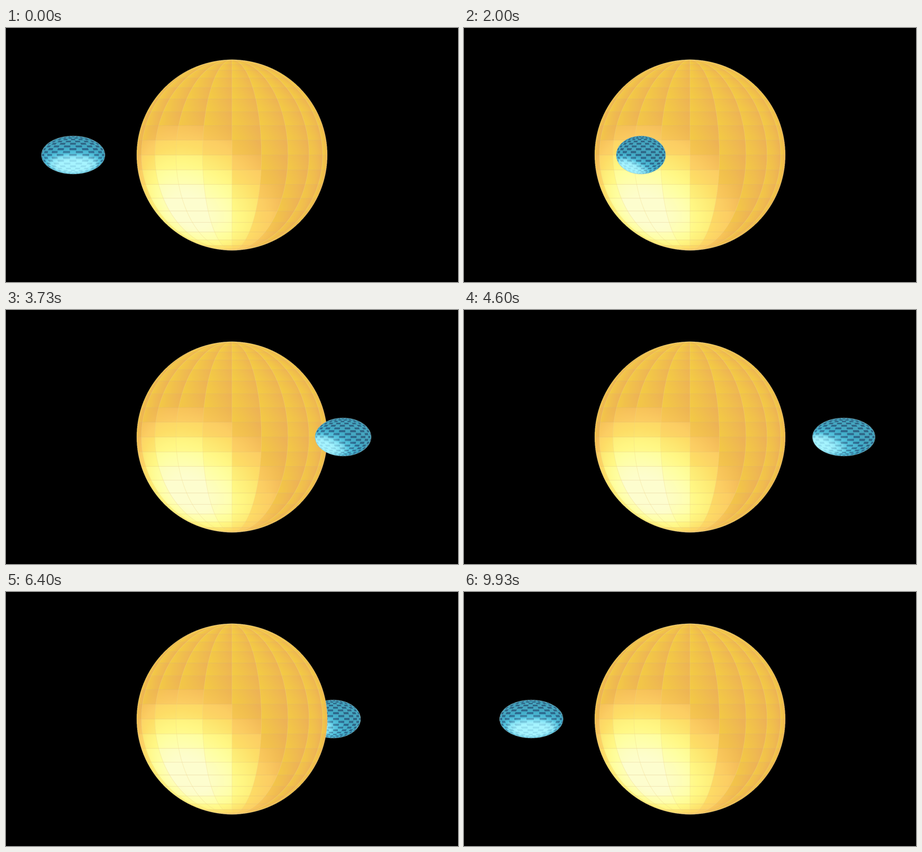
Animation of 854x480 px, one loop 10000 ms. Source, as an HTML page with a canvas:

```html
<!DOCTYPE html>
<html lang="en">
<head>
<meta charset="utf-8">
<title>Orbiting ellipsoid</title>
<style>
html, body { margin: 0; width: 100%; height: 100%; overflow: hidden; background: #000; }
canvas { display: block; width: 854px; height: 480px; }
</style>
</head>
<body>
<canvas id="stage" width="854" height="480"></canvas>
<script>
const LOOP = 10000, STEPS = 150;
const CX = 427, CY = 240, R = 180, ORBIT = 300;
const AX = 60, AY = 36, AZ = 45;           // ellipsoid half axes
const LIGHT = [-300, -400, 450];           // y up, z towards the viewer
const SS = 2;                              // supersampling
const MERIDIAN = Math.PI / 10, PARALLEL = Math.PI / 20;
const BRICK = 2 * Math.PI / 15;            // brick spacing in longitude

const ctx = document.getElementById('stage').getContext('2d');

const rgb = hex => [0, 2, 4].map(i => parseInt(hex.substr(i, 2), 16));
const mix = (a, b, k) => a.map((v, i) => v + (b[i] - v) * k);
const clamp = v => Math.max(0, Math.min(1, v));
const stops = list => list.map(([at, hex]) => [at, rgb(hex)]);

function ramp(list, v) {
  if (v <= list[0][0]) return list[0][1];
  for (let i = 1; i < list.length; i++) {
    const [a, ca] = list[i - 1], [b, cb] = list[i];
    if (v <= b) return mix(ca, cb, (v - a) / (b - a));
  }
  return list[list.length - 1][1];
}

const GOLD = stops([[0, 'efbd4a'], [.3, 'f2be50'], [.4, 'fac560'], [.5, 'fcd164'],
  [.58, 'fddd66'], [.65, 'fdea74'], [.73, 'fff784'], [.82, 'fefea0'], [.95, 'fdfdce']]);
const CYAN = stops([[0, '45a6c0'], [.35, '42adc9'], [.64, '56c5e0'], [.78, '86e4f6'], [.92, 'a6f4ff']]);
const NAVY = stops([[0, '2f6686'], [.35, '2d6a90'], [.64, '3f88a8'], [.78, '6cbdd5'], [.92, '94e0f0']]);
const YELLOW = rgb('f4cd42'), ORANGE = rgb('edb256');

// Lambert term of a point light
function lambert(p, n) {
  const l = LIGHT.map((v, i) => v - p[i]);
  const dot = l[0] * n[0] + l[1] * n[1] + l[2] * n[2];
  return dot / (Math.hypot(...l) * Math.hypot(...n));
}

// Fills a canvas of half size hw x hh from shade(x, y), y up
function paint(canvas, hw, hh, shade) {
  const w = canvas.width = 2 * hw * SS, h = canvas.height = 2 * hh * SS;
  const c = canvas.getContext('2d'), img = c.createImageData(w, h);
  for (let j = 0, o = 0; j < h; j++) {
    for (let i = 0; i < w; i++, o += 4) {
      const col = shade((i + .5) / SS - hw, hh - (j + .5) / SS);
      if (!col) continue;
      for (let k = 0; k < 3; k++) img.data[o + k] = col[k];
      img.data[o + 3] = 255;
    }
  }
  c.putImageData(img, 0, 0);
}

function onSphere(lat, lon) {
  return [Math.cos(lat) * Math.sin(lon), Math.sin(lat), Math.cos(lat) * Math.cos(lon)];
}

function sunShade(x, y) {
  const zz = R * R - x * x - y * y;
  if (zz < 0) return null;
  const n = [x / R, y / R, Math.sqrt(zz) / R];
  const col = Math.atan2(n[0], n[2]) / MERIDIAN, row = Math.asin(n[1]) / PARALLEL;
  const cell = onSphere((Math.floor(row) + .5) * PARALLEL, (Math.floor(col) + .5) * MERIDIAN);
  const lit = m => lambert(m.map(v => v * R), m);
  const v = .55 * lit(cell) + .45 * lit(n);
  const across = col - Math.floor(col), up = row - Math.floor(row);
  const dark = mix(YELLOW, ORANGE, clamp(across * .75 + up * .25 + .12 - Math.max(0, n[1]) * .2));
  return mix(dark, ramp(GOLD, v), clamp((v - .25) / .22));
}

function strokeEllipse(c, x, y, rx, ry, from = 0, to = 2 * Math.PI) {
  c.beginPath();
  c.ellipse(x, y, rx, ry, 0, from, to);
  c.stroke();
}

function makeSun() {
  const sun = document.createElement('canvas');
  paint(sun, R + 2, R + 2, sunShade);
  const c = sun.getContext('2d');
  c.scale(SS, SS);
  c.translate(R + 2, R + 2);
  c.lineWidth = .8;
  c.strokeStyle = 'rgba(215,175,120,.4)';
  for (let i = -9; i <= 9; i++) {
    const y = R * Math.sin(i * PARALLEL), w = R * Math.cos(i * PARALLEL);
    c.beginPath();
    c.moveTo(-w, y);
    c.lineTo(w, y);
    c.stroke();
  }
  c.strokeStyle = 'rgba(240,212,135,.45)';
  for (let i = -4; i <= 4; i++) {
    const side = i < 0 ? Math.PI / 2 : -Math.PI / 2;
    strokeEllipse(c, 0, 0, R * Math.sin(Math.abs(i) * MERIDIAN), R, side, side + Math.PI);
  }
  c.strokeStyle = 'rgba(225,212,150,.5)';
  strokeEllipse(c, 0, 0, R, R);
  return sun;
}

const planet = document.createElement('canvas');
const PW = AX + 2, PH = AY + 2;

function makePlanet(angle) {
  const s = Math.sin(angle), c = Math.cos(angle);
  const px = -ORBIT * c, pz = ORBIT * s;
  const ix = 1 / (AX * AX), iy = 1 / (AY * AY), iz = 1 / (AZ * AZ);
  const qa = s * s * ix + c * c * iz;
  paint(planet, PW, PH, (x, y) => {
    const qb = x * s * c * (iz - ix);
    const qc = x * x * (c * c * ix + s * s * iz) + y * y * iy - 1;
    const disc = qb * qb - qa * qc;
    if (disc < 0) return null;
    const z = (Math.sqrt(disc) - qb) / qa;
    const u = z * s - x * c, w = x * s + z * c;
    const nu = u * ix, nw = w * iz;
    const v = lambert([px + x, y, pz + z], [nw * s - nu * c, y * iy, nu * s + nw * c]);
    const row = Math.asin(y / AY) / PARALLEL + .5, r = Math.floor(row);
    const lon = Math.atan2(u / AX, w / AZ) / BRICK + (r & 1) / 2 + .25;
    const across = lon - Math.floor(lon), up = row - r;
    const brick = across < .54 && up > .12 && up < .88;
    return ramp(brick ? NAVY : CYAN, v);
  });
  const g = planet.getContext('2d');
  g.scale(SS, SS);
  g.lineWidth = .8;
  g.strokeStyle = 'rgba(150,190,195,.6)';
  strokeEllipse(g, PW, PH, Math.hypot(AX * c, AZ * s), AY);
  return CX + px;
}

const sun = makeSun();
const put = (img, x, hw, hh) => ctx.drawImage(img, x - hw, CY - hh, 2 * hw, 2 * hh);

function draw(step) {
  const angle = step / STEPS * 2 * Math.PI;
  const x = makePlanet(angle);
  const layers = [() => put(sun, CX, R + 2, R + 2), () => put(planet, x, PW, PH)];
  if (Math.sin(angle) < 0) layers.reverse();
  ctx.fillStyle = '#000';
  ctx.fillRect(0, 0, 854, 480);
  layers.forEach(f => f());
}

let shown = -1;
const start = performance.now();
function tick() {
  const t = (performance.now() - start) % LOOP;
  const step = Math.floor((t + 3.4) / LOOP * STEPS) % STEPS;
  if (step !== shown) draw(shown = step);
  requestAnimationFrame(tick);
}
tick();
</script>
</body>
</html>
```
